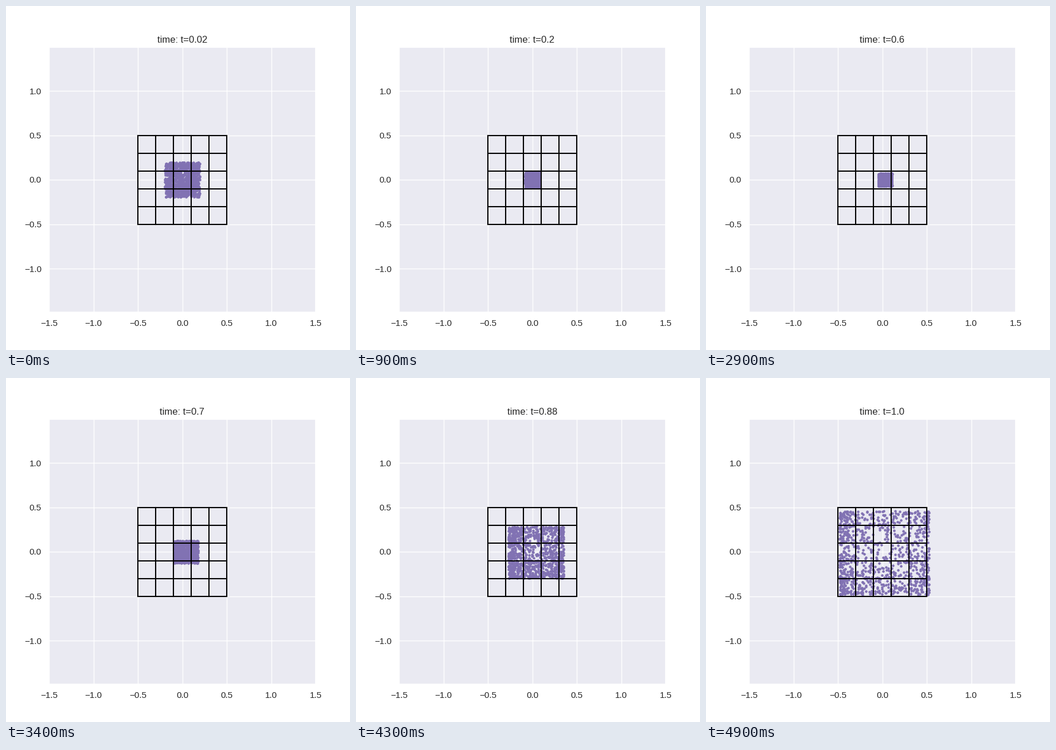
Animation, 600 px wide and 600 px high, one loop 5000 ms. Source, as a matplotlib script:

```python
import numpy as np
import matplotlib.pyplot as plt
from matplotlib.animation import FuncAnimation

FRAMES, INTERVAL = 50, 100
COUNT = 1000
INK, PANEL, PURPLE = "#262626", "#EAEAF2", "#8172B3"

plt.rcParams.update({
    "font.family": "Liberation Sans",
    "text.color": INK,
    "axes.facecolor": PANEL,
    "axes.edgecolor": "white",
    "axes.linewidth": 1.25,
    "axes.axisbelow": True,
    "axes.titlesize": 12,
    "grid.color": "white",
    "grid.linewidth": 1,
    "xtick.labelsize": 11,
    "ytick.labelsize": 11,
    "xtick.color": INK,
    "ytick.color": INK,
    "xtick.major.size": 6,
    "ytick.major.size": 6,
    "xtick.bottom": False,
    "ytick.left": False,
})

rng = np.random.default_rng(7)
start_u, start_v = rng.uniform(-1, 1, (2, COUNT))


def crowd_edges(values, skew, strength):
    """Push values towards both ends, and a little towards the lower one."""
    skewed = values - skew * (1 - values ** 2)
    return skewed + strength * (np.sin(np.pi / 2 * skewed) - skewed)


end_u = crowd_edges(start_u, skew=.12, strength=.75)
end_v = crowd_edges(start_v, skew=.1, strength=.5)


def half_extent(t, final):
    """Exponential contraction followed by quartic growth."""
    return np.hypot(.216 * np.exp(-4.7 * t), final * ((t + .06) / 1.06) ** 4)


def positions(t):
    blend = t ** 2
    u = start_u + blend * (end_u - start_u)
    v = start_v + blend * (end_v - start_v)
    pinch = .2 * np.exp(-((t - .4) / .12) ** 2)
    drift_x = .046 * np.sin(2.6 * t ** 2.25)
    drift_y = -.012 * t ** 4
    x = drift_x + half_extent(t, .505) * u * (1 - pinch * (1 - v ** 2))
    y = drift_y + half_extent(t, .47) * v * (1 - pinch * (1 - u ** 2))
    return np.column_stack([x, y])


fig, ax = plt.subplots(figsize=(6, 6), dpi=100)
fig.subplots_adjust(left=.125, right=.9, bottom=.11, top=.88)
half_y = 1.5 * .77 / .775  # equal scale on both axes
ax.set(xlim=(-1.5, 1.5), ylim=(-half_y, half_y),
       xticks=np.arange(-1.5, 1.6, .5), yticks=np.arange(-1, 1.1, .5))
ax.grid(True)

for level in np.linspace(-.5, .5, 6):
    ax.plot([level, level], [-.5, .5], color="black", lw=1.5)
    ax.plot([-.5, .5], [level, level], color="black", lw=1.5)

dots = ax.scatter(start_u, start_v, s=5, color=PURPLE, linewidths=1, zorder=1)
title = ax.set_title("")


def update(frame):
    t = round((frame + 1) / FRAMES, 2)
    dots.set_offsets(positions(t))
    title.set_text(f"time: t={t}")
    return dots, title


animation = FuncAnimation(fig, update, frames=FRAMES, interval=INTERVAL,
                          repeat=True, repeat_delay=0, blit=False)
plt.show()
```
